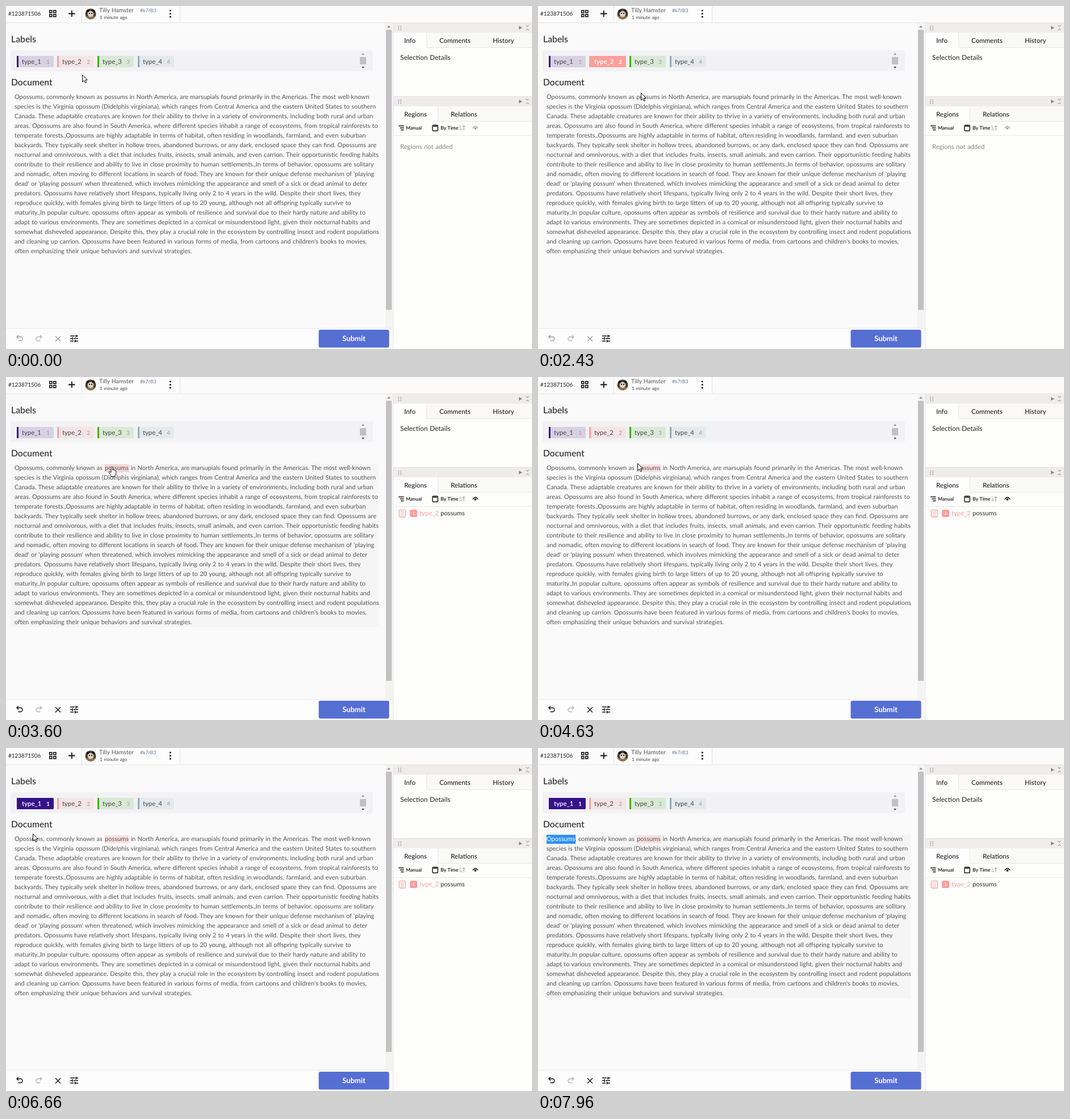
Write an HTML page with a canvas that moves like this. It is 926 by 605 pixels and loops after 8 s.

```html
<!DOCTYPE html>
<html lang="en">
<head>
<meta charset="utf-8">
<title>Text labeling</title>
<style>
html, body { margin: 0; width: 100%; height: 100%; overflow: hidden; background: #fafafb; }
canvas { display: block; width: 926px; height: 605px; }
</style>
</head>
<body>
<canvas id="stage"></canvas>
<script>
const W = 926, H = 605, LOOP = 8000;
const canvas = document.getElementById('stage');
const ctx = canvas.getContext('2d');
const dpr = window.devicePixelRatio || 1;
canvas.width = W * dpr;
canvas.height = H * dpr;
ctx.textRendering = 'geometricPrecision';

const PINK = '#ff9f9c', INK = '#111', BODY = '#555', BLUE = '#2f92f2';
const BODY_SIZE = 10.92;
const FONT = 'Lato, "Open Sans", sans-serif';

const LINES = [
  'Opossums, commonly known as possums in North America, are marsupials found primarily in the Americas. The most well-known',
  'species is the Virginia opossum (Didelphis virginiana), which ranges from Central America and the eastern United States to southern',
  'Canada. These adaptable creatures are known for their ability to thrive in a variety of environments, including both rural and urban',
  'areas. Opossums are also found in South America, where different species inhabit a range of ecosystems, from tropical rainforests to',
  'temperate forests.,Opossums are highly adaptable in terms of habitat, often residing in woodlands, farmland, and even suburban',
  'backyards. They typically seek shelter in hollow trees, abandoned burrows, or any dark, enclosed space they can find. Opossums are',
  'nocturnal and omnivorous, with a diet that includes fruits, insects, small animals, and even carrion. Their opportunistic feeding habits',
  'contribute to their resilience and ability to live in close proximity to human settlements.,In terms of behavior, opossums are solitary',
  'and nomadic, often moving to different locations in search of food. They are known for their unique defense mechanism of \'playing',
  'dead\' or \'playing possum\' when threatened, which involves mimicking the appearance and smell of a sick or dead animal to deter',
  'predators. Opossums have relatively short lifespans, typically living only 2 to 4 years in the wild. Despite their short lives, they',
  'reproduce quickly, with females giving birth to large litters of up to 20 young, although not all offspring typically survive to',
  'maturity.,In popular culture, opossums often appear as symbols of resilience and survival due to their hardy nature and ability to',
  'adapt to various environments. They are sometimes depicted in a comical or misunderstood light, given their nocturnal habits and',
  'somewhat disheveled appearance. Despite this, they play a crucial role in the ecosystem by controlling insect and rodent populations',
  'and cleaning up carrion. Opossums have been featured in various forms of media, from cartoons and children\'s books to movies,',
  'often emphasizing their unique behaviors and survival strategies.'
];

const PILLS = [
  { x: 19, w: 65, edge: '#36128a', fill: '#d7d1e2' },
  { x: 90, w: 65, edge: PINK, fill: '#f4e4e5' },
  { x: 161, w: 64, edge: '#45ae1f', fill: '#d9e9d6' },
  { x: 232, w: 64, edge: '#8bb0bf', fill: '#e4e9ec' }
];

// Pointer stops: time, x, y
const PATH = [
  [0, 134, 121], [700, 134, 121], [1030, 130, 119], [1360, 118, 99],
  [2200, 118, 99], [2430, 181, 153], [2800, 186, 158],
  [4560, 186, 158], [4860, 110, 118], [5160, 61, 94],
  [6200, 61, 94], [6660, 47, 151], [7000, 44, 157], [7360, 40, 160], [LOOP, 40, 160]
];

function rect(x, y, w, h, fill) {
  ctx.fillStyle = fill;
  ctx.fillRect(x, y, w, h);
}

function round(x, y, w, h, r, fill) {
  ctx.beginPath();
  ctx.roundRect(x, y, w, h, r);
  ctx.fillStyle = fill;
  ctx.fill();
}

function setFont(size, weight = 400) {
  ctx.font = `${weight} ${size}px ${FONT}`;
  ctx.wordSpacing = size * 0.055 + 'px';
}

function text(s, x, y, size, color, weight, align = 'left') {
  setFont(size, weight);
  ctx.fillStyle = color;
  ctx.textAlign = align;
  ctx.fillText(s, x, y);
}

function line(color, width, ...runs) {
  ctx.strokeStyle = color;
  ctx.lineWidth = width;
  ctx.beginPath();
  for (const p of runs) {
    ctx.moveTo(p[0], p[1]);
    for (let i = 2; i < p.length; i += 2) ctx.lineTo(p[i], p[i + 1]);
  }
  ctx.stroke();
}

function poly(fill, ...p) {
  ctx.beginPath();
  for (let i = 0; i < p.length; i += 2) ctx.lineTo(p[i], p[i + 1]);
  ctx.closePath();
  ctx.fillStyle = fill;
  ctx.fill();
}

function dot(x, y, r, fill) {
  ctx.beginPath();
  ctx.arc(x, y, r, 0, Math.PI * 2);
  ctx.fillStyle = fill;
  ctx.fill();
}

function avatar() {
  ctx.save();
  ctx.beginPath();
  ctx.arc(149, 14, 9.5, 0, Math.PI * 2);
  ctx.clip();
  rect(139, 4, 20, 20, '#4b3f2f');
  rect(139, 18, 20, 6, '#8a7250');
  dot(144, 8.5, 2.5, '#17130f');
  dot(153.5, 8.5, 2.5, '#17130f');
  dot(149, 14, 5.3, '#dcd4c4');
  dot(147, 13, 1.2, '#2a2119');
  dot(151, 13, 1.2, '#2a2119');
  ctx.restore();
}

function header() {
  rect(0, 0, W, 29, '#fbfbfb');
  rect(134, 0, 173, 29, '#fdfdfd');
  rect(0, 29, W, 1, '#e6e6e6');
  rect(133, 0, 1, 29, '#e2e2e2');
  rect(306, 0, 1, 29, '#e2e2e2');
  text('#123871506', 4, 17, 9.9, '#222');
  ctx.strokeStyle = INK;
  ctx.lineWidth = 1.6;
  for (const x of [76.8, 83.8])
    for (const y of [7.8, 14.8]) ctx.strokeRect(x, y, 4, 4);
  line(INK, 1.8, [110, 13.5, 121.5, 13.5], [115.8, 8, 115.8, 19]);
  avatar();
  text('Tilly Hamster', 164, 11, 10.4, '#555');
  text('#k7rB3', 236, 11, 8.8, '#6b7a94');
  text('1 minute ago', 165, 23, 8.3, '#444');
  for (const y of [8, 13.5, 19]) dot(289.3, y, 1.6, INK);
}

function labels(active) {
  text('Labels', 9, 64, 15.8, '#2b2b2b', 500);
  round(8, 78, 638, 37, 3, '#f2f2f4');
  PILLS.forEach((p, i) => {
    const on = i === active;
    round(p.x, 88, p.w, 20, 2, on ? p.edge : p.fill);
    rect(p.x, 88, 3, 20, p.edge);
    text('type_' + (i + 1), p.x + 9, 101.5, 11.3, on ? '#fff' : '#444', on ? 600 : 400);
    text(String(i + 1), p.x + p.w - 10, 101.5, 9.8, on ? '#fff' : '#9b9aa0', on ? 700 : 400, 'center');
  });
  poly('#8a8a8a', 626, 86, 631, 86, 628.5, 83);
  rect(623, 90, 11, 13, '#c1c1c1');
  poly('#444', 626, 107, 631, 107, 628.5, 110);
}

function firstLine(s) {
  const y = 164, head = 'Opossums, commonly known as ', word = 'possums';
  const rest = LINES[0].slice(head.length + word.length);
  setFont(BODY_SIZE);
  const headW = ctx.measureText(head).width;
  const wordW = ctx.measureText(word).width;
  const firstW = ctx.measureText('Opossums').width;
  const pad = s.region ? 1 : 0;
  const x = 15 + headW;
  if (s.region) rect(x, 154, wordW + 2, 14, s.onRegion ? '#f6d6d6' : '#f9dfdf');
  if (s.pickWord) rect(x, 153, wordW + 2.7, 16, BLUE);
  text(head, 15, y, BODY_SIZE, BODY);
  text(word, x + pad, y, BODY_SIZE, s.pickWord ? '#fff' : BODY);
  text(rest, x + wordW + pad * 2, y, BODY_SIZE, BODY);
  if (s.pickFirst) {
    rect(15, 153, firstW + 1, 16, BLUE);
    text('Opossums', 15, y, BODY_SIZE, '#fff');
  }
}

function documentView(s) {
  text('Document', 9, 139.5, 15.7, '#2b2b2b', 500);
  if (s.inText) rect(8, 153, 648, 288, '#f5f5f6');
  firstLine(s);
  for (let i = 1; i < LINES.length; i++) text(LINES[i], 15, 164 + 17 * i, BODY_SIZE, BODY);
  rect(668, 30, 12, 538, '#f3f3f4');
  rect(669, 42, 10, 494, '#c1c1c3');
  poly('#8a8a8a', 671, 38, 677, 38, 674, 34.5);
}

function turnArrow(cx, color, flip) {
  ctx.save();
  ctx.translate(cx, 586);
  ctx.scale(flip, 1);
  ctx.strokeStyle = color;
  ctx.lineWidth = 1.4;
  ctx.beginPath();
  ctx.moveTo(-4.5, -2.5);
  ctx.lineTo(1.5, -2.5);
  ctx.arc(1.5, 1, 3.5, -Math.PI / 2, Math.PI / 2);
  ctx.lineTo(-2.5, 4.5);
  ctx.moveTo(-2, -5.5);
  ctx.lineTo(-5, -2.5);
  ctx.lineTo(-2, 0.5);
  ctx.stroke();
  ctx.restore();
}

function footer(edited) {
  rect(0, 568, 681, 37, '#fdfdfd');
  rect(0, 568, 681, 1, '#e8e8e8');
  turnArrow(24, edited ? INK : '#a0a0a0', 1);
  turnArrow(58, '#b4b4b4', -1);
  line(edited ? INK : '#a0a0a0', 1.4, [87, 582.5, 96, 591.5], [96, 582.5, 87, 591.5]);
  line(INK, 1.6,
    [113, 582, 121, 582], [124, 582, 127, 582], [123.2, 580, 123.2, 584.5],
    [113, 586.5, 116, 586.5], [119, 586.5, 127, 586.5], [117, 584.2, 117, 589],
    [113, 591, 119, 591], [122, 591, 127, 591], [121.5, 588.7, 121.5, 593.3]);
  round(550.5, 571, 124, 31.5, 3, '#566fd3');
  text('Submit', 612.5, 591, 13, '#fff', 700, 'center');
}

function panelTop(y) {
  rect(682, y, 244, 17, '#efedeb');
  for (const x of [690.5, 694.5])
    for (const d of [5.5, 8.5, 11.5]) rect(x, y + d - 0.5, 1.5, 1.5, '#8d8d8d');
  poly('#8a8a8a', 903, y + 5.3, 903, y + 11.7, 909, y + 8.5);
  line('#777', 1, [915.5, y + 3.8, 918, y + 6.3, 920.5, y + 3.8],
    [915.5, y + 13, 918, y + 10.5, 920.5, y + 13]);
}

function tabs(y, w, names) {
  rect(682, y, 244, 26, '#f9f9f6');
  rect(682, y + 26, 244, 1, '#e6e6e4');
  rect(682, y, w, 27, '#fefefe');
  rect(682 + w, y, 1, 26, '#e6e6e4');
  for (const [name, x] of names) text(name, x, y + 18, 11.5, '#222', 500);
}

function eye(color) {
  ctx.strokeStyle = color;
  ctx.lineWidth = 1.3;
  ctx.beginPath();
  ctx.moveTo(821.7, 216);
  ctx.quadraticCurveTo(826.3, 208.5, 831, 216);
  ctx.stroke();
  dot(826.3, 216, 2, color);
}

function sidePanels(region) {
  rect(681, 30, 245, 575, '#fefefd');
  rect(681, 30, 1, 575, '#e2e2e2');
  panelTop(30);
  tabs(47, 58, [['Info', 701], ['Comments', 763], ['History', 857]]);
  text('Selection Details', 694, 95, 11.9, '#333', 500);
  rect(682, 159, 244, 1, '#e2e2e0');
  panelTop(160);
  tabs(177, 78, [['Regions', 701], ['Relations', 783]]);
  rect(682, 228, 244, 1, '#e9e9e9');

  line(INK, 1.5, [691, 211.5, 700.5, 211.5], [693.5, 215, 700.5, 215], [695, 218.5, 700.5, 218.5]);
  text('Manual', 704, 218, 8.5, INK, 600);
  ctx.strokeStyle = INK;
  ctx.lineWidth = 1.4;
  ctx.beginPath();
  ctx.roundRect(750.8, 210.3, 9.4, 10, 1.5);
  ctx.stroke();
  rect(752, 211.5, 7, 1.5, INK);
  text('By Time', 765, 218, 8.7, INK, 600);
  line('#8c8c8c', 1, [798.5, 212, 800.5, 212], [798.5, 215, 801.5, 215], [798.5, 218, 803, 218],
    [806, 219.5, 806, 211], [804, 213, 806, 211, 808, 213]);
  eye(region ? INK : '#a5a5a5');

  if (!region) {
    text('Regions not added', 694, 251.5, 11.2, '#858585');
    return;
  }
  ctx.strokeStyle = PINK;
  ctx.lineWidth = 1.3;
  ctx.beginPath();
  ctx.roundRect(692.2, 234.7, 11.2, 12.3, 1.5);
  ctx.stroke();
  line(PINK, 1.2, [694.5, 238, 701, 238], [694.5, 241, 701, 241], [694.5, 244, 701, 244]);
  round(711, 234, 13, 13, 2.5, PINK);
  text('1', 717.5, 243, 7.2, '#fff', 700, 'center');
  text('type_2', 728, 244, 11.3, PINK);
  text('possums', 765, 244, 11.2, '#2b2b2b');
}

function pointerAt(t) {
  let i = 1;
  while (i < PATH.length - 1 && PATH[i][0] < t) i++;
  const [t0, x0, y0] = PATH[i - 1], [t1, x1, y1] = PATH[i];
  const u = (t - t0) / (t1 - t0);
  const k = u * u * (3 - 2 * u);
  return { x: x0 + (x1 - x0) * k, y: y0 + (y1 - y0) * k };
}

function outline(path) {
  ctx.fillStyle = '#fff';
  ctx.strokeStyle = INK;
  ctx.lineWidth = 1;
  ctx.lineJoin = 'round';
  ctx.fill(path);
  ctx.stroke(path);
  ctx.lineJoin = 'miter';
}

const ARROW = new Path2D('M0 0V12.5L3 9.8L5 14.3L7 13.4L5.1 9.1L8.8 8.8Z');
const HAND = new Path2D('M-1.5 10V1.2Q-1.5 0 0 0Q1.3 0 1.3 1.2V5.5Q3.5 4.6 3.7 6.2Q5.4 5.5 5.7 7Q7.3 6.5 7.3 8.2V11Q7.3 14 5.5 15V17H-1.8V15L-5.3 10.2Q-6 8.8 -4.7 8.4Q-3.6 8.2 -1.5 10Z');

function pointer(p, kind) {
  ctx.save();
  ctx.translate(Math.round(p.x) + 0.5, Math.round(p.y) + 0.5);
  if (kind === 'hand') outline(HAND);
  else if (kind === 'arrow') outline(ARROW);
  else if (kind === 'beam') line('#333', 1, [-2.5, -5, 2.5, -5], [0, -5, 0, 7], [-2.5, 7, 2.5, 7]);
  ctx.restore();
}

function stateAt(t) {
  const p = pointerAt(t);
  const inside = (x, y, w, h) => p.x >= x && p.x <= x + w && p.y >= y && p.y <= y + h;
  const region = t >= 3460;
  const s = {
    p, region,
    active: t >= 1860 && t < 3460 ? 1 : t >= 5960 ? 0 : -1,
    pickWord: t >= 3230 && t < 3460,
    pickFirst: t >= 7730,
    inText: inside(8, 154, 648, 287),
    onRegion: region && inside(172, 154, 45, 15)
  };
  const onPill = PILLS.some(q => inside(q.x, 88, q.w, 20));
  s.kind = onPill || s.onRegion ? 'hand'
    : s.pickWord || s.pickFirst ? 'none'
    : s.inText ? 'beam' : 'arrow';
  return s;
}

function draw(t) {
  const s = stateAt(t);
  ctx.setTransform(dpr, 0, 0, dpr, 0, 0);
  rect(0, 0, W, H, '#fafafb');
  header();
  labels(s.active);
  documentView(s);
  footer(s.region);
  sidePanels(s.region);
  pointer(s.p, s.kind);
}

const start = performance.now();
function tick() {
  draw((performance.now() - start) % LOOP);
  requestAnimationFrame(tick);
}
tick();
</script>
</body>
</html>
```
